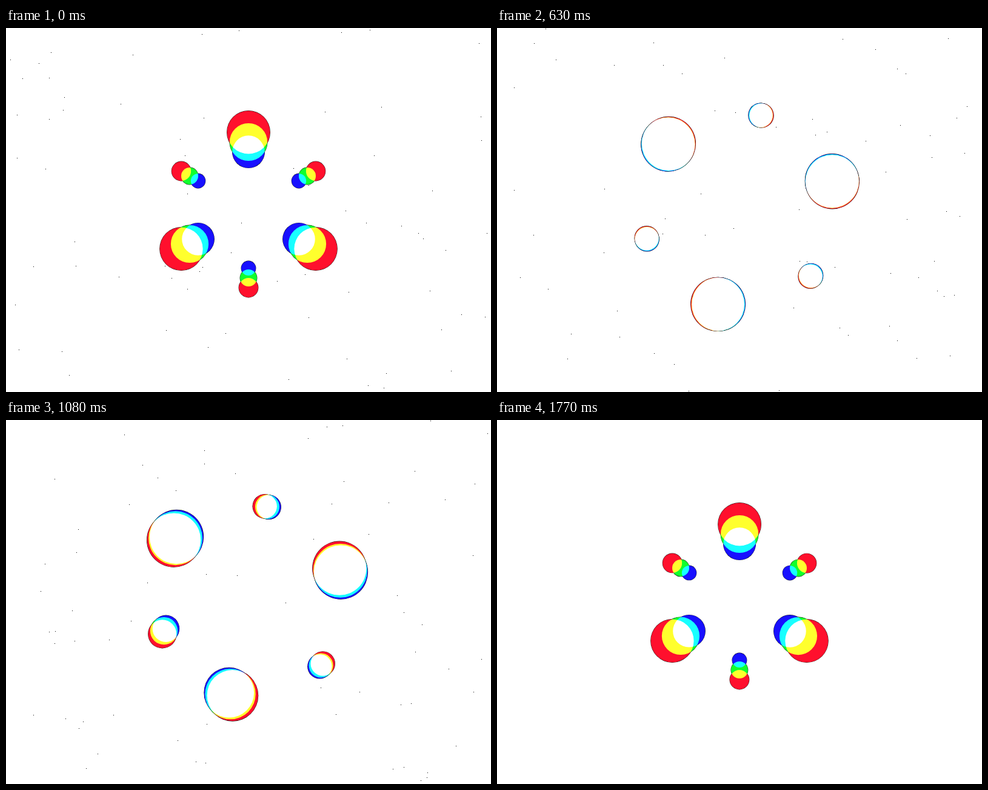
Write an HTML page with a canvas that moves like this. It is 800 px wide and 600 px high and loops after 1800 ms.

```html
<!DOCTYPE html>
<html lang="en">
<head>
<meta charset="utf-8">
<title>Six discs</title>
<style>
html, body { margin: 0; width: 100%; height: 100%; overflow: hidden; background: #fff; }
canvas { display: block; width: 800px; height: 600px; }
</style>
</head>
<body>
<canvas id="stage" width="800" height="600"></canvas>
<script>
const ctx = document.getElementById('stage').getContext('2d');
const STEPS = 60, STEP_MS = 30;
const ORBIT = 160, BIG = 44.44, SMALL = 20;
const SWELL_AT = 2.5, SHRINK_AT = 31.65, STAGGER = 1.5, MOVE = 12;

// each channel rests at its own scale and spins with its own sharpness
const CHANNELS = [
  { color: 'rgb(255,16,45)', rest: 0.8, power: 12 },
  { color: 'rgb(16,255,45)', rest: 0.7, power: 14 },
  { color: 'rgb(24,16,255)', rest: 0.6, power: 16 }
];

const clamp = x => Math.min(1, Math.max(0, x));
const mix = (a, b, p) => a + (b - a) * p;

function ease(x, g) {
  return x < 0.5 ? 0.5 * Math.pow(2 * x, g) : 1 - 0.5 * Math.pow(2 - 2 * x, g);
}

// 0 at rest, 1 while swollen; disc k follows its neighbour by STAGGER
function swell(k, n, g) {
  const part = from => ease(clamp((n - from - k * STAGGER) / MOVE), g);
  return part(SWELL_AT) - part(SHRINK_AT);
}

function seeded(seed) {
  let s = (seed * 2654435761 + 12345) >>> 0;
  return () => {
    s = (s + 0x6D2B79F5) >>> 0;
    let z = Math.imul(s ^ (s >>> 15), s | 1);
    z ^= z + Math.imul(z ^ (z >>> 7), z | 61);
    return ((z ^ (z >>> 14)) >>> 0) / 4294967296;
  };
}

function specks(n) {
  if (n === STEPS - 1) return;
  const rnd = seeded(n + 1);
  const count = n < 48 ? 70 : 130;
  ctx.fillStyle = '#000';
  for (let i = 0; i < count; i++) {
    ctx.fillRect(Math.floor(rnd() * 800), Math.floor(rnd() * 600), 1, 1);
  }
}

function place(k, n, channel) {
  const scale = mix(channel.rest, 1, swell(k, n, 2));
  const swap = swell(k, n, 3);
  const sway = 15 * ease(1 - Math.abs(n / 30 - 1), 2);
  const spin = 120 * ease(n / STEPS, channel.power);
  const a = (120 - 60 * k + sway + spin) * Math.PI / 180;
  return {
    x: 400 + ORBIT * scale * Math.sin(a),
    y: 300 - ORBIT * scale * Math.cos(a),
    r: scale * (k % 2 ? mix(SMALL, BIG, swap) : mix(BIG, SMALL, swap))
  };
}

function disc(c, grow, color) {
  ctx.fillStyle = color;
  ctx.beginPath();
  ctx.arc(c.x, c.y, c.r + grow, 0, 2 * Math.PI);
  ctx.fill();
}

function draw(n) {
  ctx.globalCompositeOperation = 'source-over';
  ctx.fillStyle = '#fff';
  ctx.fillRect(0, 0, 800, 600);
  specks(n);
  for (let k = 0; k < 6; k++) {
    const spots = CHANNELS.map(ch => place(k, n, ch));
    ctx.globalCompositeOperation = 'source-over';
    spots.forEach(c => disc(c, 0.4, '#000'));
    ctx.globalCompositeOperation = 'lighten';
    spots.forEach((c, i) => disc(c, 0, CHANNELS[i].color));
  }
}

const start = performance.now();
function tick() {
  draw(Math.floor((performance.now() - start) / STEP_MS) % STEPS);
  requestAnimationFrame(tick);
}
tick();
</script>
</body>
</html>
```
